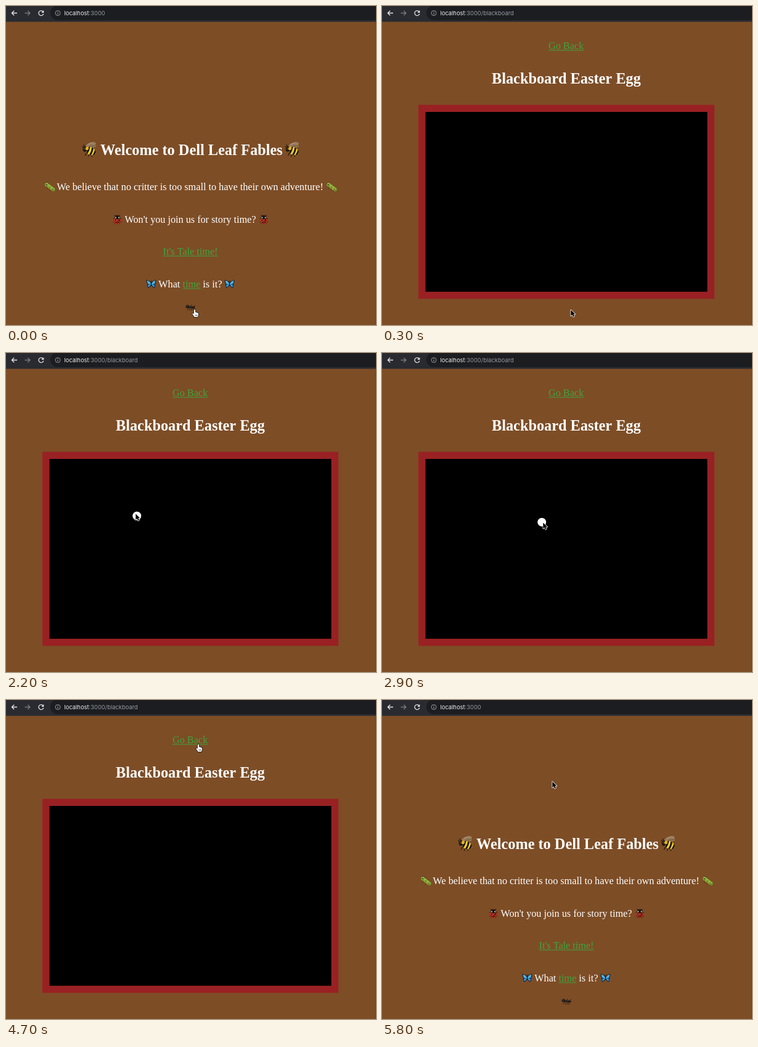
Animation, 600 px wide and 518 px high, one loop 5900 ms. Source, as an HTML page with a canvas:

```html
<!DOCTYPE html>
<html lang="en">
<head>
<meta charset="utf-8">
<title>Blackboard</title>
<style>
html, body { margin: 0; width: 100%; height: 100%; overflow: hidden; background: #7d4d26; }
canvas { display: block; }
</style>
</head>
<body>
<canvas id="stage" width="600" height="518"></canvas>
<script>
const c = document.getElementById('stage').getContext('2d');
const LOOP = 5900, STEP = 100;
const SERIF = '"Liberation Serif", "Times New Roman", serif';
const BODY = '16.2px ' + SERIF, TITLE = 'bold 24.3px ' + SERIF;
const GREEN = '#3ca63c';

// time, x, y of the pointer tip
const PATH = [
  [0, 306, 493], [500, 306, 493], [800, 302, 462], [1100, 316, 386],
  [1300, 380, 382], [1500, 420, 329], [1700, 345, 343], [2000, 240, 312],
  [2300, 195, 235], [2600, 225, 268], [2900, 261, 275], [3200, 240, 190],
  [3500, 245, 116], [3800, 278, 94], [4100, 303, 73], [4200, 312, 72],
  [4700, 312, 72], [4800, 312, 71], [5100, 312, 71], [5700, 276, 132], [LOOP, 276, 132]
];

function pointer(t) {
  let i = 1;
  while (PATH[i][0] < t) i++;
  const [t0, x0, y0] = PATH[i - 1], [t1, x1, y1] = PATH[i];
  const k = (t - t0) / (t1 - t0);
  return [x0 + (x1 - x0) * k, y0 + (y1 - y0) * k];
}

function rect(x, y, w, h, color) {
  c.fillStyle = color;
  c.fillRect(x, y, w, h);
}

function oval(x, y, rx, ry, color, turn = 0) {
  c.fillStyle = color;
  c.beginPath();
  c.ellipse(x, y, rx, ry, turn, 0, 7);
  c.fill();
}

function stroke(d, color, width = 1) {
  c.strokeStyle = color;
  c.lineWidth = width;
  c.stroke(new Path2D(d));
}

function fill(d, color) {
  c.fillStyle = color;
  c.fill(new Path2D(d));
}

function text(s, x, y, font = BODY, color = '#fff') {
  c.font = font;
  c.fillStyle = color;
  c.fillText(s, x, y);
  return c.measureText(s).width;
}

function link(s, x, y) {
  const w = text(s, x, y, BODY, GREEN);
  rect(x, y + 1.5, w, 1, GREEN);
}

function place(draw, x, y) {
  c.save();
  c.translate(x, y);
  draw();
  c.restore();
}

function bee() {
  stroke('M8 18l-2 5M12 20l-1 5M16 21l1 4M5 10L1 8M6 9L3 5', '#1b1509', 1.1);
  oval(15, 5.5, 8.5, 3.6, '#a58c6b', -0.35);
  oval(18, 7.5, 6, 2.4, '#8d7352', -0.1);
  stroke('M8 8L22 2M10 9L22 6', '#695036', 0.6);
  c.save();
  c.beginPath();
  c.ellipse(14.5, 15.5, 9.5, 6.2, 0.42, 0, 7);
  c.clip();
  rect(0, 0, 26, 26, '#f4cb2f');
  stroke('M13 7Q12 14 8 20M18 9Q18 16 13 23M23 12Q23 18 18 24', '#17130b', 2.8);
  c.restore();
  oval(6, 12.5, 4, 4.2, '#201a10');
  oval(4.7, 11.5, 1.4, 2, '#4a3b25');
  oval(9, 11.3, 2.5, 3, '#e2ae26', 0.4);
}

function caterpillar() {
  stroke('M4 1L2 0M5 1L6 0M4 9l-1 2M8 12l-1 2M11 14l-1 1', '#3c3416', 0.8);
  for (let i = 0; i < 6; i++) {
    const x = 3.2 + i * 2.1, y = 4 + i * 1.6;
    oval(x, y, 2.9, 2.9, i % 2 ? '#6e9a2d' : '#8eb83d');
    oval(x + 0.8, y - 1, 0.9, 0.8, i ? '#d9d464' : '#a7c64a');
    if (i) oval(x - 0.5, y + 0.8, 0.8, 0.8, '#a83f24');
  }
  oval(2.4, 4, 0.7, 0.9, '#1d1a0d');
}

function ladybug() {
  stroke('M4 3L2 0M9 3L11 0M2 7L0 6M11 7L13 6M2 11l-2 1M11 11l2 1M3 14l-1 1M10 14l1 1', '#19110e', 0.9);
  oval(6.5, 4.2, 4.4, 3.5, '#1b1717');
  oval(6.5, 9.3, 5.7, 5.5, '#b9281c');
  oval(5, 8.2, 3.3, 3, '#dd4a2e');
  oval(6.5, 5.3, 4.4, 1.7, '#171313');
  oval(3.8, 4.5, 1.1, 1, '#ded6c9');
  oval(9.2, 4.5, 1.1, 1, '#ded6c9');
  stroke('M6.5 6V14.6', '#2a1110', 0.8);
  for (const x of [3.7, 9.3]) {
    oval(x, 8.8, 1.2, 1.2, '#1b1110');
    oval(x + (x < 6 ? 0.7 : -0.7), 12, 1, 1, '#1b1110');
  }
}

function butterfly() {
  for (const side of [1, -1]) {
    c.save();
    c.translate(8, 0);
    c.scale(side, 1);
    fill('M0 7Q3 1 7.7 0.4Q8.6 4 6.4 7.8Q7 11 5.2 14Q1.5 13 0 8Z', '#142536');
    fill('M0.6 7Q3.4 2.3 6.8 1.8Q7 5 5 7.4L1 8Z', '#3cadea');
    fill('M0.8 8.2L5.4 8.5Q5.8 11 4.7 12.8Q2 11.4 0.8 8.2Z', '#268bd0');
    stroke('M0.8 7.2L5.8 3.2M1 8.2L4.6 11.2', '#94dcfb', 0.6);
    c.restore();
  }
  stroke('M8 5V11M8 5L6.5 2M8 5L9.5 2', '#1c1814', 1);
}

function ant() {
  stroke('M6 6L2 10M8 7L6 11M9 7L11 11M10 6L14 10M6 4L4 1M9 4L10 1M14 4L16 2M14 5L16 7', '#17120f', 0.8);
  oval(3.4, 4.1, 3.2, 2.5, '#211c1b', 0.2);
  oval(8.4, 5.2, 2.7, 1.6, '#29211d', 0.1);
  oval(12.8, 5.2, 2.3, 2, '#1d1817');
  oval(2.7, 3.2, 1.3, 0.7, '#5a4e48');
  oval(12.8, 4.4, 0.8, 0.5, '#544840');
}

function pair(draw, x1, x2, y) {
  place(draw, x1, y);
  place(draw, x2, y);
}

function toolbar(path) {
  rect(0, 0, 600, 25, '#292b30');
  c.fillStyle = '#1b1d20';
  c.beginPath();
  c.roundRect(72, -1, 540, 24, 12);
  c.fill();
  rect(0, 25, 600, 1, '#44382f');
  stroke('M18 11.5H9.5M13.2 7.7L9.4 11.5L13.2 15.3', '#e3e5e8', 1.3);
  stroke('M30.5 11.5H39M35.2 7.7L39 11.5L35.2 15.3', '#777a80', 1.3);
  stroke('M60.2 9.2A4 4 0 1 0 60.8 12.7', '#e3e5e8', 1.3);
  fill('M61.3 7V11H57.3Z', '#e3e5e8');
  stroke('M88 11.5A4 4 0 1 1 80 11.5A4 4 0 1 1 88 11.5', '#a4a7ac', 0.9);
  rect(83.5, 11, 1, 2.8, '#a4a7ac');
  rect(83.5, 9.1, 1, 1, '#a4a7ac');
  const font = '9.4px Inter, Roboto, sans-serif';
  const w = text('localhost', 94.5, 15, font, '#eceef0');
  text(':3000' + path, 94.5 + w, 15, font, '#969a9f');
}

function home() {
  pair(bee, 122.5, 451.5, 220);
  text('Welcome to Dell Leaf Fables', 153, 242, TITLE);
  pair(caterpillar, 63, 520, 286);
  text('We believe that no critter is too small to have their own adventure!', 82.5, 298.5);
  pair(ladybug, 174, 411.5, 339);
  text("Won't you join us for story time?", 192.5, 352);
  link("It's Tale time!", 254.5, 404);
  pair(butterfly, 227.5, 354.5, 444);
  text('What', 247.3, 457);
  link('time', 286.5, 457);
  text('is it?', 319.3, 457);
  place(ant, 291, 484);
}

function board() {
  link('Go Back', 270, 70);
  text('Blackboard Easter Egg', 178, 126, TITLE);
  rect(59, 160.5, 480, 315, '#992123');
  rect(70.5, 172, 457, 292, '#000');
}

function arrow() {
  const d = 'M0.3 0.5V10.3L2.6 8.2L4.2 11.7L5.9 10.9L4.4 7.5H7.3Z';
  stroke(d, '#fff', 1.5);
  fill(d, '#000');
}

function hand() {
  const d = 'M-1.2 7V1.2Q-1 0 0 0Q1 0 1.1 1.2V4.4Q2.5 3.8 2.9 4.8Q4.2 4.3 4.5 5.4Q6 5.2 6 6.6V8.2Q5.8 9.8 4.8 12H-0.6Q-1.2 10.4 -3.8 7.6Q-4 6.2 -2.6 6.2Z';
  stroke(d, '#111', 1.4);
  fill(d, '#fff');
  stroke('M0.9 8V10.5M2.5 8V10.5M4 8V10.5', '#222', 0.6);
}

function draw(t) {
  const onBoard = t >= 300 && t < 4800;
  const [x, y] = pointer(t);
  rect(0, 0, 600, 518, '#7d4d26');
  rect(599, 26, 1, 492, '#684224');
  toolbar(t >= 300 && t < 4900 ? '/blackboard' : '');
  if (onBoard) board(); else home();
  if (onBoard && x > 71 && x < 527 && y > 172 && y < 464) {
    const [bx, by] = pointer(t - 15);
    oval(bx, by, 7, 7, '#fff');
  }
  place(t < 300 || (t >= 4200 && t < 4800) ? hand : arrow, x, y);
}

c.lineJoin = 'round';
const start = performance.now();
function tick() {
  const t = (performance.now() - start) % LOOP;
  draw(Math.floor(t / STEP) * STEP);
  requestAnimationFrame(tick);
}
tick();
</script>
</body>
</html>
```
